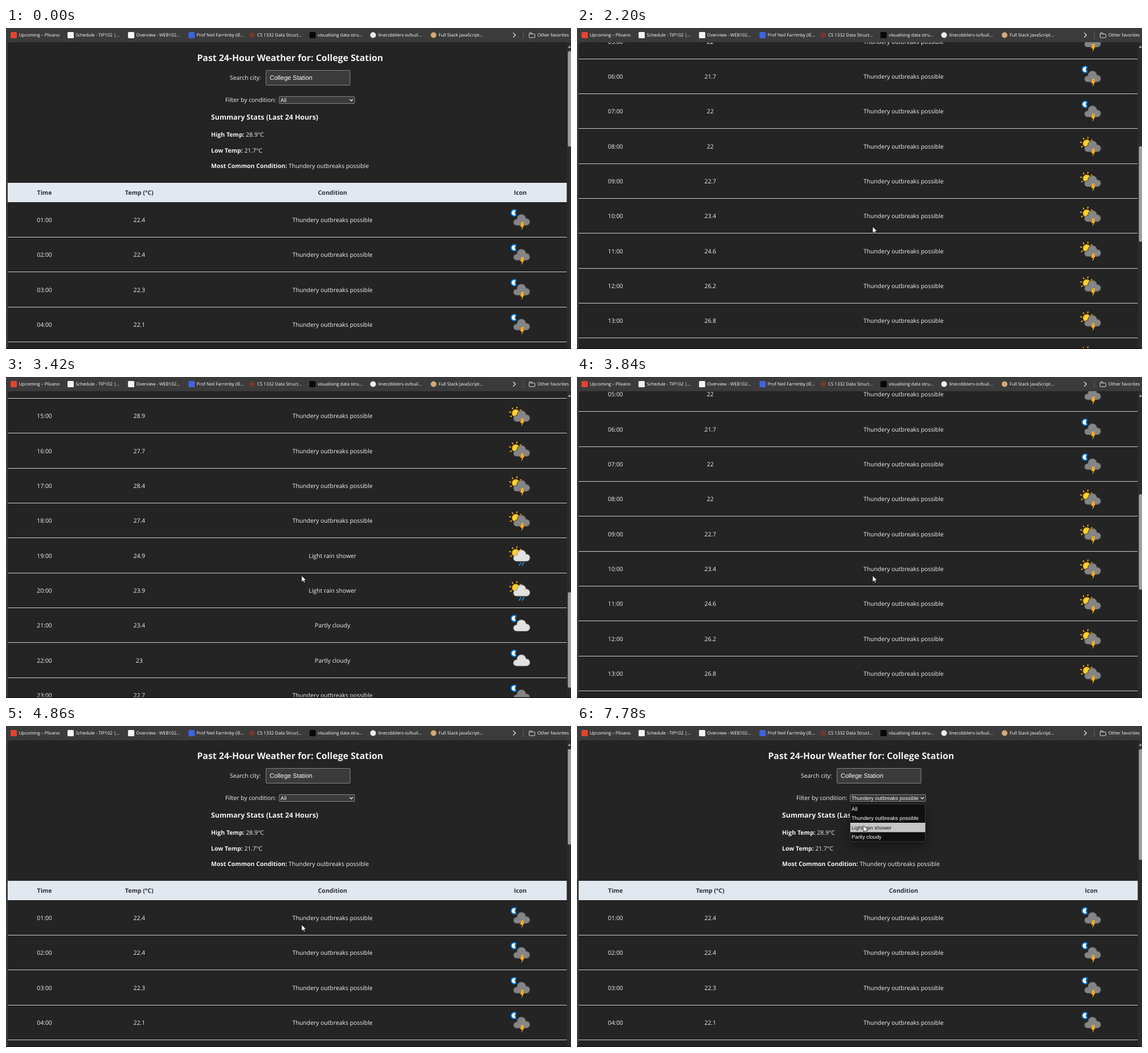
Write an HTML page with a canvas that moves like this. It is 992 px wide and 564 px high and loops after 8 s.

```html
<!DOCTYPE html>
<html lang="en">
<head>
<meta charset="utf-8">
<title>Past 24-Hour Weather</title>
<style>
  html, body { margin: 0; width: 100%; height: 100%; overflow: hidden; background: #242424; }
  canvas { display: block; }
</style>
</head>
<body>
<canvas id="stage" width="992" height="564"></canvas>
<script>
const ctx = document.getElementById('stage').getContext('2d');
const LOOP = 8000;
const PAGE = '#242424', BAR = '#3b3b3b', TEXT = '#f2f2f2', WHITE = '#fff', GREY = '#9f9f9f';
const UI = '"Open Sans", "Noto Sans", sans-serif';
const FORM = '"Liberation Sans", Arial, sans-serif';
const BODY = 10.4, BOLD = 10.55, BARTEXT = 7.85, FIELD = 9.2;
const ROW_TOP = 306, ROW_H = 61.33;
const MENU_TOP = 137, ITEM_H = 16.5;
const PICK_AT = 6790, OPEN_AT = 5990, REOPEN_AT = 7450;
const STORM = 'Thundery outbreaks possible', RAIN = 'Light rain shower', CLOUDY = 'Partly cloudy';
const OPTIONS = ['All', STORM, RAIN, CLOUDY];
const COLUMNS = { 'Time': 67.5, 'Temp (°C)': 234, 'Condition': 573.3, 'Icon': 903 };

const readings = ('22.4 22.4 22.3 22.1 22 21.7 22 22 22.7 23.4 24.6 26.2 ' +
  '26.8 28 28.9 27.7 28.4 27.4 24.9 23.9 23.4 23 22.7 22.5').split(' ');
const rows = readings.map((temp, i) => {
  const hour = (i + 1) % 24;
  return {
    time: String(hour).padStart(2, '0') + ':00',
    temp,
    night: hour < 8 || hour > 20,
    condition: hour < 19 || hour > 22 ? STORM : hour < 21 ? RAIN : CLOUDY
  };
});

const progress = (t, from, to) => Math.min(1, Math.max(0, (t - from) / (to - from)));

// Each gesture: start, end, distance
const gestures = [[1115, 2070, 558], [2200, 3220, 598], [3400, 3840, -604], [3970, 4860, -552]];
const scrollAt = t => gestures.reduce((sum, [from, to, by]) => sum + by * progress(t, from, to), 0);

// Each move: start, end, x, y
const moves = [[110, 380, 613, 380], [560, 900, 519, 349], [5080, 5920, 500, 126],
  [6150, 6590, 505, 158], [PICK_AT, 7050, 499, 125], [REOPEN_AT, 7780, 503, 175]];
const pointerAt = t => moves.reduce(([x, y], [from, to, toX, toY]) => {
  const k = progress(t, from, to);
  return [x + (toX - x) * k, y + (toY - y) * k];
}, [911, 533]);

function rect(x, y, w, h, fill) {
  ctx.fillStyle = fill;
  ctx.fillRect(x, y, w, h);
}

function paint(fill, stroke, width = 1) {
  if (fill) { ctx.fillStyle = fill; ctx.fill(); }
  if (stroke) { ctx.strokeStyle = stroke; ctx.lineWidth = width; ctx.stroke(); }
}

function box(x, y, w, h, r, fill, stroke) {
  ctx.beginPath();
  ctx.roundRect(x, y, w, h, r);
  paint(fill, stroke);
}

function disc(x, y, r, fill) {
  ctx.beginPath();
  ctx.arc(x, y, r, 0, Math.PI * 2);
  paint(fill);
}

function line(x1, y1, x2, y2, color, width) {
  ctx.beginPath();
  ctx.moveTo(x1, y1);
  ctx.lineTo(x2, y2);
  paint(null, color, width);
}

function chevron(x, y, size, turn, width) {
  ctx.save();
  ctx.translate(x, y);
  ctx.rotate(turn);
  ctx.beginPath();
  ctx.moveTo(-size, -size);
  ctx.lineTo(0, 0);
  ctx.lineTo(-size, size);
  paint(null, '#ececec', width);
  ctx.restore();
}

// y is the middle of the capitals; returns the width
function text(str, x, y, size, { weight = 400, color = TEXT, align = 'left', family = UI } = {}) {
  ctx.font = `${weight} ${size}px ${family}`;
  ctx.textRendering = 'geometricPrecision';
  ctx.textAlign = align;
  ctx.fillStyle = color;
  ctx.fillText(str, x, Math.round(y + size * 0.357));
  return ctx.measureText(str).width;
}

function cloud(fill, edge) {
  for (const [grow, color] of [[1, edge], [0, fill]]) {
    disc(-6.5, 4.3, 5 + grow, color);
    disc(2, -2, 7.5 + grow, color);
    disc(10.5, 3.5, 5.8 + grow, color);
    box(-7 - grow, 2 - grow, 18 + 2 * grow, 7.3 + 2 * grow, 3, color);
  }
}

function sun() {
  disc(-8, -5, 6.8, '#f5a000');
  disc(-8, -5, 5.6, '#ffd42a');
  for (let a = 0.2; a < 2 * Math.PI; a += Math.PI / 4) {
    const c = Math.cos(a), s = Math.sin(a);
    line(-8 + 9.3 * c, -5 + 9.3 * s, -8 + 11 * c, -5 + 11 * s, '#ffb000', 1.9);
  }
}

function moon() {
  ctx.beginPath();
  ctx.arc(-10.7, -12.5, 5.4, -0.9, 0.9, true);
  ctx.quadraticCurveTo(-10, -12.5, -7.3, -16.7);
  ctx.closePath();
  paint(WHITE, '#0b78d8', 2);
}

const bolt = new Path2D('M1.8 4h4.6l-1.7 4.4h2.3l-5 10 .9-6.4h-2.9z');
const arrow = new Path2D('M0 0v11.2l2.6-2.4 1.8 3.8 1.8-.8-1.7-3.7h3.6z');

function weatherIcon(x, y, { night, condition }) {
  const storm = condition === STORM;
  ctx.save();
  ctx.translate(x, y);
  ctx.lineCap = ctx.lineJoin = 'round';
  night ? moon() : sun();
  storm ? cloud('#858585', '#4a4a4a') : cloud('#e2e2e2', '#949494');
  if (storm) {
    ctx.fillStyle = '#ffae1a';
    ctx.fill(bolt);
  }
  if (condition === RAIN) {
    line(1, 12.2, -2, 17, '#2b8ed8', 1.7);
    line(6, 12.2, 3, 17, '#2b8ed8', 1.7);
  }
  ctx.restore();
}

const bookmarks = [
  ['Upcoming – Plivano', '#e44332'],
  ['Schedule - TIP102 |...', '#f4f4f4'],
  ['Overview - WEB102...', '#f4f4f4'],
  ['Prof Neil Farrimby (IE...', '#3e63dd'],
  ['CS 1332 Data Struct...', '#73382f', true],
  ['visualising data stru...', '#080808'],
  ['linecobblers-io/buil...', '#f4f4f4', true],
  ['Full Stack JavaScript...', '#d6a878', true]
];

function bookmarkBar() {
  rect(0, 0, 992, 25, BAR);
  bookmarks.forEach(([label, color, round], i) => {
    const x = Math.max(8, 1.8 + 106.2 * i);
    round ? disc(x + 5.5, 12.5, 5, color) : box(x, 7, 11, 11, 1.5, color);
    text(label, x + 14.4, 12.4, BARTEXT, { color: WHITE });
  });
  chevron(894.5, 12.5, 4, 0, 1.2);
  rect(908, 6, 1, 13, '#5c5c5c');
  box(918.5, 8.5, 5, 3, 1, null, '#dcdcdc');
  box(918.5, 10.5, 10, 6.5, 1, BAR, '#dcdcdc');
  text('Other favorites', 933, 12.4, BARTEXT, { color: WHITE });
}

function summary(selected) {
  const field = { color: WHITE, family: FORM };
  text('Past 24-Hour Weather for: College Station', 498.8, 52, 1.5 * BOLD, { weight: 700, align: 'center' });
  text('Search city:', 393, 87, BODY);
  box(456.5, 74.5, 147.5, 26, 1, BAR, '#858585');
  text('College Station', 463, 87, 11.06, field);

  text('Filter by condition:', 385, 126, BODY);
  box(479.5, 120.5, 132.5, 12, 1, BAR, '#858585');
  text(OPTIONS[selected], 482, 126.5, FIELD, field);
  chevron(606.3, 128, 2.7, Math.PI / 2, 1.4);

  text('Summary Stats (Last 24 Hours)', 360, 157, 1.17 * BOLD, { weight: 700 });
  const stats = { 'High Temp: ': '28.9°C', 'Low Temp: ': '21.7°C', 'Most Common Condition: ': STORM };
  Object.entries(stats).forEach(([label, value], i) => {
    const y = 187.3 + 27.5 * i;
    const width = text(label, 360, y, BOLD, { weight: 700 });
    text(value, 360 + width, y, BODY);
  });
}

function table(scroll, selected) {
  rect(3, 272 - scroll, 981.5, 34, '#e2e8f0');
  for (const [label, x] of Object.entries(COLUMNS)) {
    text(label, x, 289.4 - scroll, BOLD, { weight: 700, color: '#252d38', align: 'center' });
  }
  const [timeX, tempX, conditionX, iconX] = Object.values(COLUMNS);
  const centered = { align: 'center' };
  rows.filter(row => !selected || row.condition === OPTIONS[selected]).forEach((row, i) => {
    const top = ROW_TOP + i * ROW_H - scroll, y = top + 31.2;
    text(row.time, timeX, y, BODY, centered);
    text(row.temp, tempX, y, BODY, centered);
    text(row.condition, conditionX, y, BODY, centered);
    weatherIcon(iconX, y, row);
    rect(3, Math.floor(top + ROW_H + 0.05), 981.5, 1, '#c9ced5');
  });
}

function scrollbar(scroll, selected) {
  rect(985, 25, 7, 539, '#2c2c2c');
  ctx.beginPath();
  ctx.moveTo(986.5, 35);
  ctx.lineTo(989.3, 30.5);
  ctx.lineTo(992, 35);
  paint(GREY);
  box(986.5, 40.5 + scroll * 0.2995, 6, selected ? 195 : 168, 3, GREY);
}

function menu(hover) {
  const height = ITEM_H * OPTIONS.length;
  ctx.save();
  ctx.shadowColor = 'rgba(0,0,0,.45)';
  ctx.shadowBlur = 22;
  ctx.shadowOffsetY = 8;
  box(479, MENU_TOP, 133, height, 4, '#101010');
  ctx.restore();
  box(479.5, MENU_TOP, 132, height, 4, '#101010', '#3a3a3a');
  OPTIONS.forEach((label, i) => {
    const y = MENU_TOP + i * ITEM_H, active = i === hover;
    if (active) rect(480, y, 131.5, ITEM_H, '#c6c6c6');
    text(label, 482, y + ITEM_H / 2, FIELD, { color: active ? '#181818' : WHITE, family: FORM });
  });
}

function pointer(x, y) {
  ctx.save();
  ctx.translate(x, y);
  ctx.fillStyle = WHITE;
  ctx.fill(arrow);
  ctx.strokeStyle = '#111';
  ctx.lineWidth = 0.8;
  ctx.stroke(arrow);
  ctx.restore();
}

function draw(t) {
  const scroll = scrollAt(t);
  const [x, y] = pointerAt(t);
  const selected = t >= PICK_AT ? 1 : 0;
  const open = (t >= OPEN_AT && t < PICK_AT) || t >= REOPEN_AT;

  rect(0, 0, 992, 564, BAR);
  ctx.save();
  ctx.beginPath();
  ctx.roundRect(3, 25, 989, 545, [5, 0, 0, 0]);
  ctx.clip();
  rect(3, 25, 989, 539, PAGE);
  ctx.save();
  ctx.translate(0, -scroll);
  summary(selected);
  ctx.restore();
  table(scroll, selected);
  ctx.restore();

  scrollbar(scroll, selected);
  bookmarkBar();
  rect(0, 562.5, 992, 1.5, '#1d1416');
  if (open) menu(y >= MENU_TOP ? Math.floor((y - MENU_TOP) / ITEM_H) : selected);
  if (t >= moves[0][0]) pointer(x, y);
}

function frame() {
  draw(performance.now() % LOOP);
  requestAnimationFrame(frame);
}
frame();
</script>
</body>
</html>
```
